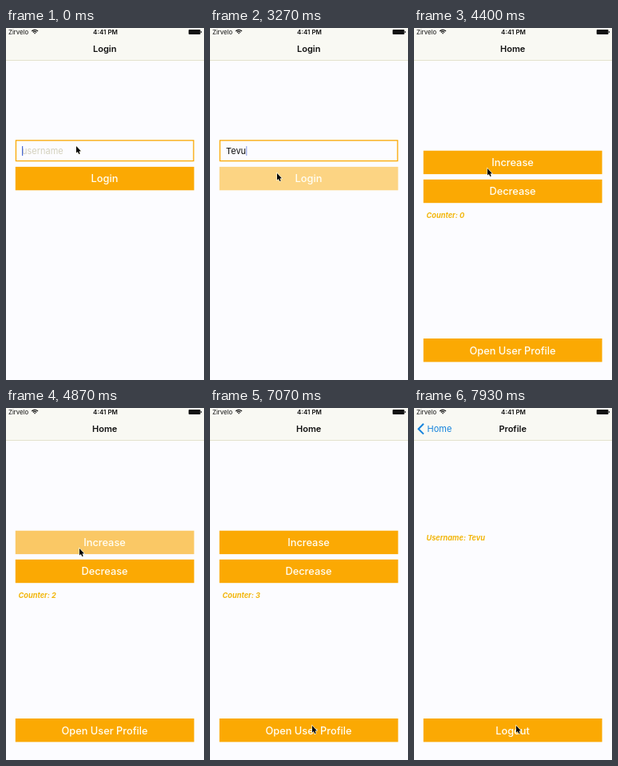
Write an HTML page with a canvas that moves like this. It is 248 px wide and 441 px high and loops after 8 s.

```html
<!DOCTYPE html>
<html lang="en">
<head>
<meta charset="utf-8">
<title>Login, counter and profile</title>
<style>
  html, body { margin: 0; width: 100%; height: 100%; overflow: hidden; background: #fcfcff; }
  canvas { display: block; width: 248px; height: 441px; }
</style>
</head>
<body>
<canvas id="stage"></canvas>
<script>
const W = 248, H = 441, LOOP = 8000;
const PAPER = '#fcfcff', ORANGE = '#fba903', BAR = '#f9f9f3', BLUE = '#1583dc';
const USER = 'Tevu';
const KEYS = [530, 930, 1540, 2200];
const HOME_AT = 3430, PUSH_AT = 7430, PUSH_TIME = 500;
const TAPS = [[4400, 4530], [4670, 4800], [4940, 5070]];
// time, x, y of the pointer tip
const POINTER = [[2730, 88, 148], [3130, 84, 182], [3870, 84, 182], [4200, 92, 176],
                 [5200, 92, 176], [5530, 122, 345], [6070, 128, 398]];

const canvas = document.getElementById('stage');
const ctx = canvas.getContext('2d');
const ratio = window.devicePixelRatio || 1;
canvas.width = W * ratio;
canvas.height = H * ratio;

const clamp = v => Math.min(1, Math.max(0, v));
const mix = (a, b, p) => a + (b - a) * p;
const smooth = p => p * p * (3 - 2 * p);
const font = (size, weight = 400, style = 'normal') => `${style} ${weight} ${size}px Inter, sans-serif`;

function text(str, x, y, face, color, align = 'left') {
  ctx.font = face;
  ctx.fillStyle = color;
  ctx.textAlign = align;
  ctx.textBaseline = 'alphabetic';
  ctx.fillText(str, x, y);
}

function box(x, y, w, h, color) {
  ctx.fillStyle = color;
  ctx.fillRect(x, y, w, h);
}

function layer(alpha, dx, draw) {
  ctx.save();
  ctx.globalAlpha *= alpha;
  ctx.translate(dx, 0);
  draw();
  ctx.restore();
}

function pressAlpha(t, presses) {
  const depth = presses.map(([down, up]) =>
    t < up ? smooth(clamp((t - down) / 100)) : 1 - smooth(clamp((t - up) / 220)));
  return 1 - 0.52 * Math.max(0, ...depth);
}

// The white label looks the same over a faded fill, so only the fill fades.
function button(label, y, alpha = 1) {
  layer(alpha, 0, () => box(11.8, y, 223.8, 29.4, ORANGE));
  text(label, 123.5, y + 19.5, font(12.8, 500), '#fffef4', 'center');
}

function note(str, y) {
  text(str, 15.5, y, font(9.2, 700, 'italic'), '#f2b60c');
}

function title(str) {
  text(str, 123.7, 30, font(11, 600), '#111', 'center');
}

// The caret stays solid after each key, then blinks.
function caretAlpha(t) {
  const last = [-210, ...KEYS].filter(k => k <= t).pop();
  const phase = (t - last) % 1150;
  return phase < 800 ? 1 - clamp((phase - 540) / 180) : clamp((phase - 970) / 180);
}

function loginPage(t) {
  const typed = USER.slice(0, KEYS.filter(k => k <= t).length);
  box(11.8, 140.2, 223.8, 27, ORANGE);
  box(13.1, 141.5, 221.2, 24.4, PAPER);
  text(typed || 'username', 20, 157.5, font(11), typed ? '#111' : '#d3d0bd');
  const caretX = 20 + (typed ? ctx.measureText(typed).width : 0);
  layer(caretAlpha(t), 0, () => box(caretX, 148, 1.2, 12, '#4969d6'));
  button('Login', 173.9, pressAlpha(t, [[3180, 3300]]));
}

function homePage(t) {
  button('Increase', 153.7, pressAlpha(t, TAPS));
  button('Decrease', 189.8);
  note('Counter: ' + TAPS.filter(([, up]) => up <= t).length, 238.3);
  button('Open User Profile', 389, pressAlpha(t, [[7270, 7380]]));
}

function profilePage() {
  box(0, 41, W, H - 41, PAPER);
  note('Username: ' + USER, 166.3);
  button('Logout', 389);
}

function statusBar() {
  text('Zirvelo', 3, 7.8, font(7.8), '#111');
  text('4:41 PM', 124.5, 7.8, font(8, 600), '#111', 'center');
  ctx.strokeStyle = '#111';
  ctx.lineWidth = 1.2;
  for (const r of [0.9, 3.1, 5.3]) {
    ctx.beginPath();
    ctx.arc(36.1, 7.6, r, -Math.PI * 0.76, -Math.PI * 0.24);
    ctx.stroke();
  }
  ctx.fillStyle = '#111';
  ctx.beginPath();
  ctx.roundRect(228.7, 2, 14.8, 6, 1);
  ctx.fill();
  ctx.fillRect(244, 4, 0.9, 2);
}

function chevron() {
  ctx.strokeStyle = BLUE;
  ctx.lineWidth = 2;
  ctx.beginPath();
  ctx.moveTo(12, 19.8);
  ctx.lineTo(5.6, 26.2);
  ctx.lineTo(12, 32.6);
  ctx.stroke();
}

function navBar(t, push) {
  box(0, 0, W, 40, BAR);
  box(0, 40, W, 0.8, '#dedcc0');
  statusBar();
  if (t < HOME_AT) return title('Login');
  const slide = -92 * push;
  layer(1 - push, slide, () => title('Home'));
  if (!push) return;
  layer(push, 92 + slide, () => text('Home', 16.6, 30, font(11), BLUE));
  layer(push, 0, chevron);
  layer(push, 124 * (1 - push), () => title('Profile'));
}

function pointer(t) {
  let [, x, y] = POINTER[0];
  for (let i = 1; i < POINTER.length; i++) {
    const [t0, x0, y0] = POINTER[i - 1], [t1, x1, y1] = POINTER[i];
    if (t < t0) break;
    const p = smooth(clamp((t - t0) / (t1 - t0)));
    x = mix(x0, x1, p);
    y = mix(y0, y1, p);
  }
  ctx.save();
  ctx.translate(x, y);
  ctx.beginPath();
  [[0, 0], [0, 8.6], [1.9, 6.9], [3.3, 10], [4.7, 9.4], [3.4, 6.4], [5.9, 6.2]]
    .forEach(([px, py]) => ctx.lineTo(px, py));
  ctx.closePath();
  ctx.lineWidth = 1.1;
  ctx.strokeStyle = '#fffef0';
  ctx.stroke();
  ctx.fillStyle = '#000';
  ctx.fill();
  ctx.restore();
}

function pushProgress(t) {
  const p = clamp((t - PUSH_AT) / PUSH_TIME);
  return p === 1 ? 1 : 1 - (1 + 8 * p) * Math.exp(-8 * p);
}

function render(t) {
  const push = pushProgress(t);
  ctx.setTransform(ratio, 0, 0, ratio, 0, 0);
  box(0, 0, W, H, PAPER);
  if (t < HOME_AT) loginPage(t);
  else layer(1, -74 * push, () => homePage(t));
  if (push > 0) layer(1, W * (1 - push), profilePage);
  navBar(t, push);
  pointer(t);
}

const start = performance.now();
function tick() {
  render((performance.now() - start) % LOOP);
  requestAnimationFrame(tick);
}
tick();
</script>
</body>
</html>
```
